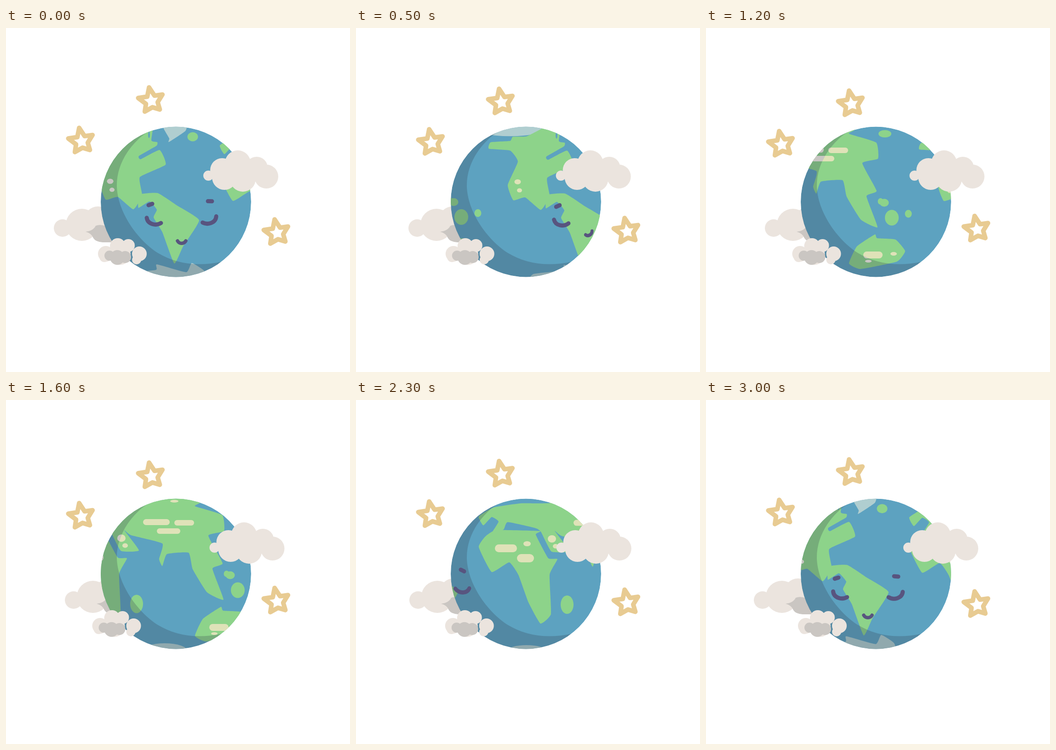
Recreate the animation shown at these times as an HTML page with a canvas. Size 748 by 748 pixels, loop 3100 ms.

```html
<!DOCTYPE html>
<html>
<head>
<meta charset="utf-8">
<style>
html, body { margin: 0; width: 100%; height: 100%; overflow: hidden; background: #fff; }
canvas { display: block; }
</style>
</head>
<body>
<canvas id="stage" width="748" height="748"></canvas>
<script>
const ctx = document.getElementById('stage').getContext('2d');
const STEPS = 31, STEP_MS = 100, SPEED = 25, PERIOD = 773, TILT = 0.009;
const OCEAN = '#5da2c0', LAND = '#8dd38a', ICE = '#b0ced0', SAND = '#dfe2b8', SAND_SHADE = '#c8c6c3';
const SHADE = 'rgba(52,64,80,.26)', CLOUD = '#ebe4de', CLOUD_SHADE = '#cac6c2', STAR = '#e8cb92', INK = '#58547f';

// Closed, slightly rounded outline through a few x,y key points.
function coast(...p) {
  const path = new Path2D(), n = p.length / 2, soft = 0.07;
  const at = i => { const j = (i + n) % n * 2; return [p[j], p[j + 1]]; };
  path.moveTo(p[0], p[1]);
  for (let i = 0; i < n; i++) {
    const [a, b, c, d] = [at(i - 1), at(i), at(i + 1), at(i + 2)];
    path.bezierCurveTo(
      b[0] + (c[0] - a[0]) * soft, b[1] + (c[1] - a[1]) * soft,
      c[0] - (d[0] - b[0]) * soft, c[1] - (d[1] - b[1]) * soft, c[0], c[1]);
  }
  path.closePath();
  return path;
}
function oval(x, y, rx, ry = rx) {
  const path = new Path2D();
  path.ellipse(x, y, rx, ry, 0, 0, 7);
  return path;
}
function pill(x, y, w, h) {
  const path = new Path2D();
  path.roundRect(x, y, w, h, h / 2);
  return path;
}
function puffs(...circles) {
  const path = new Path2D();
  for (const c of circles) path.addPath(oval(...c));
  return path;
}
function starPath() {
  const path = new Path2D();
  for (let i = 0; i < 10; i++) {
    const angle = (i * 36 - 98) * Math.PI / 180;
    const [x, y, r] = i % 2 ? [316.5, 159, 13.5] : [315, 157, 28];
    path.lineTo(x + r * Math.cos(angle), y + r * Math.sin(angle));
  }
  path.closePath();
  return path;
}

const globe = oval(369.5, 378, 163.5);
const shadow = new Path2D('M312 223C276 246 240 290 241 345C243 400 285 460 330 489C368 512 415 520 470 508V560H190V223Z');

// Map regions; coordinates are on screen when the map has scrolled by `at`.
const regions = [
  { at: 200, ice: [oval(410, 215, 82, 21)] },
  {
    at: 75, // North America
    land: [coast(397,195, 391,245, 404,249, 402,257, 364,279, 368,286, 409,266, 422,298, 366,325, 371,365, 352,395,
      318,368, 292,374, 280,341, 302,290, 285,266, 239,262, 243,248, 285,245, 291,236, 321,235, 362,214)],
    water: [oval(386, 233, 2, 7)],
    sand: [oval(301.5, 334, 7, 5.5), oval(305.5, 352.5, 5.5, 4.5)]
  },
  {
    at: 0, // South America and the polar coasts
    land: [coast(290,362, 330,359, 372,386, 420,418, 385,475, 366,512, 340,444, 321,412, 328,395, 312,377, 288,391),
      oval(406, 236.5, 11.5, 10)],
    ice: [coast(343,205, 343,219, 355,240, 354,248, 390,224, 393,205),
      coast(250,560, 260,534, 326,526, 328,514, 392,531, 404,511, 432,529, 432,560)]
  },
  {
    at: 400, // Europe and Asia
    land: [coast(92,252, 125,232, 185,223, 249,222, 262,190, 424,190, 424,222, 411,231, 470,250, 474,285, 440,295,
      471,355, 449,367, 473,434, 437,418, 406,368, 397,332, 350,335, 340,361, 333,346, 340,312, 272,294,
      257,283, 289,327, 250,328, 227,285, 215,277, 155,264, 146,280, 118,292, 135,263, 120,253, 102,271)],
    ice: [oval(345, 546, 50, 17)],
    sand: [pill(298, 259, 58, 13), pill(366, 261, 43, 12), pill(328, 279, 51, 12), oval(366, 220, 9, 3)]
  },
  {
    at: 575, // Africa
    land: [coast(267,320, 281,297, 305,283, 400,285, 391,293, 418,344, 438,346, 421,380, 424,465, 401,486,
      375,440, 353,380, 333,353, 295,374), oval(459, 445, 14, 20)],
    ice: [oval(371, 545, 42, 12)],
    sand: [oval(426, 302, 9, 8), oval(434, 318, 6, 5), oval(372, 312.5, 8, 5.5),
      pill(302, 314, 48, 17), pill(350, 335, 37, 18)]
  },
  {
    at: 300, // Australia and the islands
    land: [coast(311,512, 328,475, 367,449, 372,457, 412,460, 433,485, 415,508, 336,524), oval(389, 230, 14, 8),
      oval(379.5, 377, 6, 7), oval(387.5, 380, 10, 8.5), oval(404, 412.5, 15, 17), oval(440, 404, 7.5, 8.5)],
    sand: [pill(342, 486, 42, 15), oval(408, 491, 7, 4), oval(353, 507, 7, 3)]
  }
];

const eye = new Path2D('M-16 -8C-14 6 4 10 15 3');
const mirroredEye = new Path2D('M16 -8C14 6 -4 10 -15 3');
const face = [
  { x: 322, y: 421, width: 9, path: eye },
  { x: 442, y: 421, width: 9, path: mirroredEye },
  { x: 314, y: 384, width: 9, path: new Path2D('M-4 1.5L4 -1.5') },
  { x: 443.5, y: 379, width: 9, path: new Path2D('M-4.5 -.5L4.5 .5') },
  { x: 382, y: 465, width: 7.5, path: new Path2D('M-9 -2C-5 5 5 5 9 -2') }
];

const star = starPath();
const backCloud = puffs([123, 435, 19], [165, 428, 35], [200, 418, 30], [215, 440, 26]);
const backShade = new Path2D('M173 443Q190 441 195 430Q212 424 232 440V466H210Q195 465 190 457Q186 446 173 443Z');
const smallCloud = puffs([217, 491, 17], [243, 474, 17], [266, 473, 14], [290, 491, 16], [214, 498, 11],
  [284, 504, 10], [248, 492, 23]);
const smallShade = puffs([225, 495, 11], [242, 499, 16], [259, 498, 13]);
const bigCloud = puffs([440, 321, 11], [470, 309, 26], [504, 294, 28], [545, 304, 24], [566, 323, 26],
  [515, 328, 28], [475, 325, 27]);

function shifted(dx, dy, paint) {
  ctx.save();
  ctx.translate(dx, dy);
  paint();
  ctx.restore();
}
function fill(path, colour) {
  ctx.fillStyle = colour;
  ctx.fill(path);
}

function drawLayer(kind, colour, scroll) {
  for (const region of regions) {
    const shift = ((scroll - region.at) % PERIOD + PERIOD) % PERIOD;
    for (const dx of [shift, shift - PERIOD]) {
      shifted(dx, dx * TILT, () => (region[kind] || []).forEach(path => fill(path, colour)));
    }
  }
}

// Features travel along a bowl: near the rim they rise, tilt and narrow.
function drawFace(step) {
  const t = step > STEPS / 2 ? step - STEPS : step;
  const travel = t < 0 ? 26 * t - 4 : SPEED * t;
  const sink = t ? 5 : 0;
  ctx.strokeStyle = INK;
  for (const { x, y, width, path } of face) {
    const off = x + travel - 360;
    if (Math.abs(off) > 200) continue;
    const rim = off / 165;
    shifted(x + travel, y + sink - 36 * rim ** 4, () => {
      ctx.scale(1 - 0.2 * Math.min(1, rim ** 4), 1);
      ctx.rotate(-0.66 * rim ** 3);
      ctx.lineWidth = width;
      ctx.stroke(path);
    });
  }
}

function drawGlobe(step) {
  const scroll = step * SPEED;
  ctx.save();
  ctx.clip(globe);
  fill(globe, OCEAN);
  drawLayer('ice', ICE, scroll);
  drawLayer('land', LAND, scroll);
  drawLayer('water', OCEAN, scroll);
  drawLayer('sand', SAND, scroll);
  fill(shadow, SHADE);
  ctx.save();
  ctx.clip(shadow);
  drawLayer('sand', SAND_SHADE, scroll);
  ctx.restore();
  drawFace(step);
  ctx.restore();
}

function drawCloud(dx, body, shade) {
  shifted(dx, 0, () => {
    fill(body, CLOUD);
    if (shade) fill(shade, CLOUD_SHADE);
  });
}

function drawStar(dx, dy) {
  shifted(dx, dy, () => {
    ctx.strokeStyle = STAR;
    ctx.lineWidth = 10;
    ctx.stroke(star);
  });
}

function draw(step) {
  // Drift out, pause, drift back.
  const drift = Math.max(0, Math.min(step / 12, 1, (30 - step) / 14));
  ctx.fillStyle = '#fff';
  ctx.fillRect(0, 0, 748, 748);
  ctx.lineCap = ctx.lineJoin = 'round';
  drawCloud(24 * drift, backCloud, backShade);
  drawGlobe(step);
  drawCloud(-12.5 * drift, smallCloud, smallShade);
  drawCloud(13.5 * drift, bigCloud);
  drawStar(0, 7 * drift);
  drawStar(-152, 88 + 7 * drift);
  drawStar(273, 287 - 7.5 * drift);
}

function tick() {
  draw(Math.floor(performance.now() / STEP_MS) % STEPS);
  requestAnimationFrame(tick);
}
tick();
</script>
</body>
</html>
```
